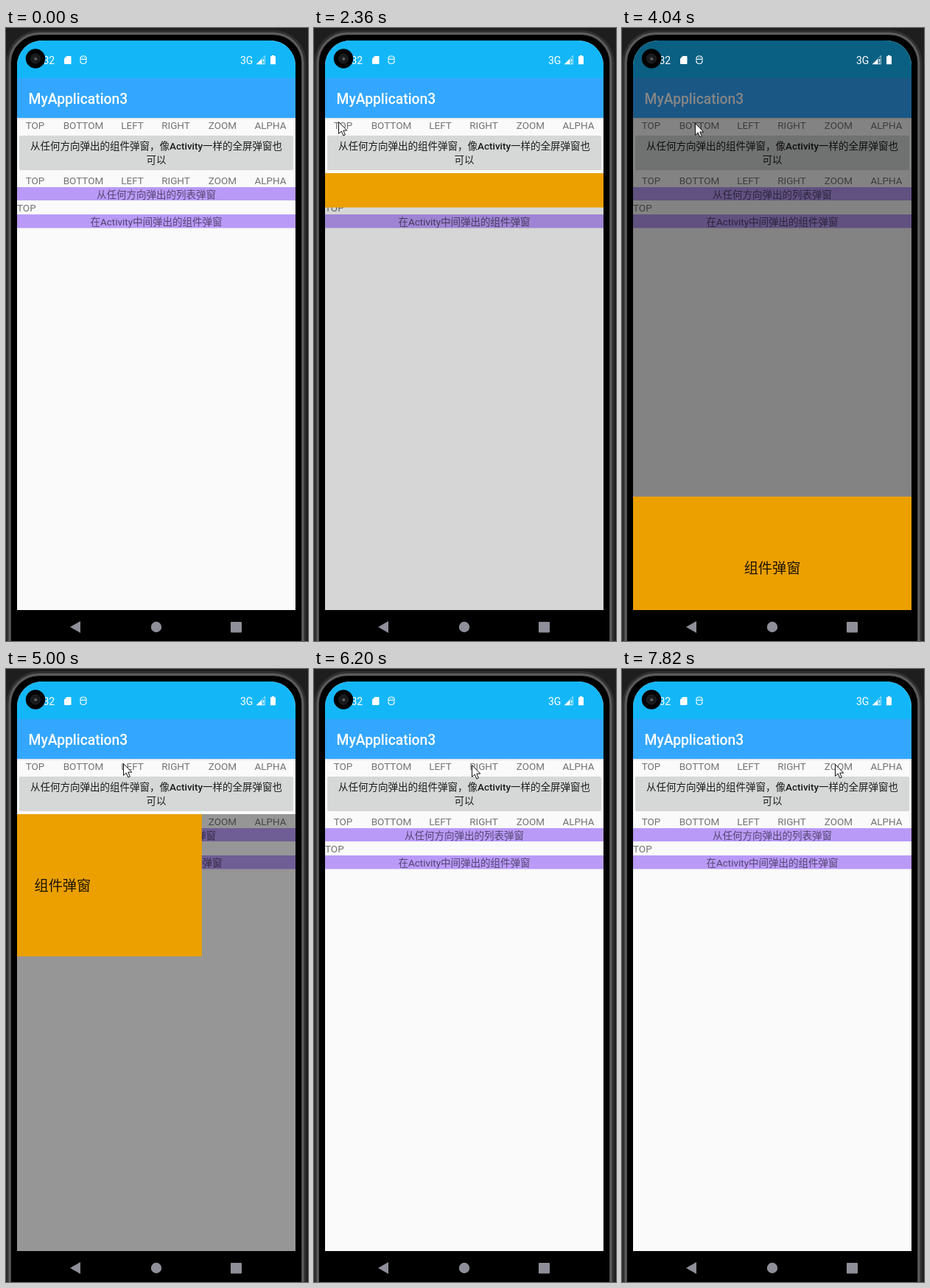
These frames come from a looping animation (410 px wide and 832 px high, 8000 ms). An HTML page:

```html
<!DOCTYPE html>
<html lang="zh-CN">
<head>
<meta charset="utf-8">
<title>MyApplication3</title>
<style>
@property --p { syntax: "<number>"; inherits: true; initial-value: 0; }
html, body { margin: 0; width: 100%; height: 100%; overflow: hidden; background: #000; }
svg { display: block; width: 100%; height: 100%; }
text { font: 13.5px Roboto, "Noto Sans CJK SC", "Noto Sans CJK", sans-serif; fill: #000; }
.soft { fill-opacity: .54; }
.strong { fill-opacity: .87; }
.mid text, text.mid { text-anchor: middle; }
.medium { font-weight: 500; }
.title { font-size: 19.3px; font-weight: 500; fill: #fff; }
.status text { font-size: 14px; fill: #fff; }
.sheet rect { fill: #eba000; }
.sheet text { font-size: 19.2px; }

/* --p is how far a popup is open: it drives both shade and slide */
.layer { --p: 0; animation: 8s cubic-bezier(.364, 0, .636, 1) infinite; }
.shade { opacity: calc(.6 * var(--p)); }
.top { animation-name: top; }
.bottom { animation-name: bottom; }
.left { animation-name: left; }
.right { animation-name: right; }
.top .sheet { transform: translateY(calc((var(--p) - 1) * 193px)); }
.bottom .sheet { transform: translateY(calc(593px - var(--p) * 193px)); }
.left .sheet { transform: translateX(calc((var(--p) - 1) * 378px)); }
.right .sheet { transform: translateX(calc((1 - var(--p)) * 378px)); }
@keyframes top {
  0%, 17.05% { --p: 0; } 20.8%, 27.83% { --p: 1; } 30.33%, 100% { --p: 0; }
}
@keyframes bottom {
  0%, 39.12% { --p: 0; } 42.87%, 49.77% { --p: 1; } 52.27%, 100% { --p: 0; }
}
@keyframes left {
  0%, 60.24% { --p: 0; } 63.99%, 70.87% { --p: 1; } 73.37%, 100% { --p: 0; }
}
@keyframes right {
  0%, 81.25% { --p: 0; } 85%, 91.75% { --p: 1; } 94.25%, 100% { --p: 0; }
}

.pointer { animation: move 8s ease-in-out infinite, appear 8s step-end infinite; }
.click { fill: #ff0; opacity: 0; animation: click 8s step-end infinite; }
@keyframes appear { 0% { opacity: 0; } 1.625%, 100% { opacity: 1; } }
@keyframes move {
  0%, 1.625% { transform: translate(370px, 764px); animation-timing-function: linear; }
  3.75% { transform: translate(325px, 560px); animation-timing-function: linear; }
  6.25% { transform: translate(200px, 185px); animation-timing-function: linear; }
  8% { transform: translate(122px, 62px); animation-timing-function: ease-out; }
  9% { transform: translate(95px, 42px); }
  11.125% { transform: translate(56px, 114px); animation-timing-function: ease-out; }
  13.75%, 18.625% { transform: translate(31px, 127px); }
  21.125%, 30% { transform: translate(33px, 127px); }
  34.5%, 51.25% { transform: translate(99px, 129px); }
  57.5%, 71.875% { transform: translate(159px, 128px); }
  77.25%, 92.5% { transform: translate(214px, 130px); }
  97.625%, 100% { transform: translate(289px, 129px); }
}
@keyframes click {
  0%, 17.5%, 28.375%, 39.75%, 50.25%, 60%, 71.375%, 81.625%, 92.25%, 100% { opacity: 0; }
  16.125%, 27%, 37.875%, 48.875%, 58.375%, 70%, 80%, 90.875% { opacity: .47; }
}
</style>
</head>
<body>
<svg viewBox="0 0 410 832">
  <defs>
    <clipPath id="screen"><path d="M15 790V51A34 34 0 0 1 49 17H359A34 34 0 0 1 393 51V790Z"/></clipPath>
    <clipPath id="body"><path d="M15 197H393V790H15Z"/></clipPath>
    <linearGradient id="shadow" x2="0" y2="1">
      <stop stop-opacity=".1"/><stop offset="1" stop-opacity="0"/>
    </linearGradient>
    <g id="labels" class="mid">
      <text class="soft" x="39.5">TOP</text>
      <text class="soft" x="105">BOTTOM</text>
      <text class="soft" x="171.5">LEFT</text>
      <text class="soft" x="230.5">RIGHT</text>
      <text class="soft" x="294">ZOOM</text>
      <text class="soft" x="359">ALPHA</text>
    </g>
    <rect id="shade" x="15" y="17" width="378" height="773"/>
    <g id="sheet" class="sheet">
      <rect x="15" y="197" width="378" height="193"/>
      <text class="mid strong" x="204" y="301">组件弹窗</text>
    </g>
  </defs>

  <!-- phone case -->
  <rect width="410" height="832" fill="#1e1e1e"/>
  <g fill="none">
    <rect x="4" y="6.5" width="400" height="900" rx="41" stroke="#303030" stroke-width="7"/>
    <rect x="5" y="7.5" width="398" height="900" rx="40" stroke="#5c5c5c" stroke-width="3"/>
  </g>
  <rect x="7" y="9.5" width="394" height="900" rx="38"/>

  <g clip-path="url(#screen)">
    <rect x="15" y="17" width="378" height="773" fill="#fafafa"/>
    <rect x="15" y="17" width="378" height="51" fill="#13b7f8"/>
    <rect x="15" y="68" width="378" height="54" fill="#33a7ff"/>
    <rect x="15" y="122" width="378" height="3" fill="url(#shadow)"/>
    <text class="title" x="30.5" y="102.5">MyApplication3</text>

    <use href="#labels" y="136.5"/>
    <rect x="18" y="146.5" width="372" height="46.5" rx="2" fill-opacity=".14"/>
    <rect x="18.5" y="146" width="371" height="46" rx="2" fill="#d6d7d7"/>
    <g class="mid">
      <text class="strong" x="204" y="164.5">从任何方向弹出的组件弹窗，像<tspan class="medium">Activity</tspan>一样的全屏弹窗也</text>
      <text class="strong" x="204" y="184">可以</text>
    </g>
    <use href="#labels" y="212"/>
    <path d="M15 216H393V234H15ZM15 253H393V271.5H15Z" fill="#b99af7"/>
    <text class="mid soft" x="204" y="230.5">从任何方向弹出的列表弹窗</text>
    <text class="soft" x="15" y="249">TOP</text>
    <text class="mid soft" x="204" y="268">在Activity中间弹出的组件弹窗</text>

    <g clip-path="url(#body)">
      <g class="layer top"><use href="#shade" class="shade"/><use href="#sheet" class="sheet"/></g>
      <g class="layer left"><use href="#shade" class="shade"/><use href="#sheet" class="sheet"/></g>
      <g class="layer right"><use href="#shade" class="shade"/><use href="#sheet" class="sheet"/></g>
    </g>
    <g class="layer bottom"><use href="#shade" class="shade"/><use href="#sheet" class="sheet"/></g>
  </g>

  <!-- status bar -->
  <g class="status" fill="#fff">
    <text x="50.5" y="48.5">32</text>
    <path d="M82.5 38H87.5Q88.5 38 88.5 39V48Q88.5 49 87.5 49H80Q79 49 79 48V41.5Z"/>
    <path d="M101 42.5V41Q101 38 105 38T109 41V42.5ZM101 43.5V45Q101 48.5 105 48.5T109 45V43.5" fill="none" stroke="#fff" stroke-width="1.2"/>
    <path d="M103 40.5H104.2M105.8 40.5H107" stroke="#fff"/>
    <text x="318" y="48.5">3G</text>
    <path d="M340 49L347.5 41.5V49Z"/>
    <path d="M347.5 41.5L351.5 37.5V49H340" fill="none" stroke="#fff" stroke-opacity=".6"/>
    <path d="M349.5 42V46M349.5 47V48.5" stroke="#fff" stroke-width="1.4"/>
    <path d="M361 37H364V38.2H366V49.2H359V38.2H361Z"/>
  </g>

  <!-- camera -->
  <circle cx="40" cy="41.5" r="13.2"/>
  <circle cx="40" cy="41.5" r="6.5" fill="#17191b" stroke="#222526"/>
  <circle cx="40" cy="41.5" r="2.6" fill="#34383a"/>
  <circle cx="40.5" cy="42" r="1.1" fill="#8a9092"/>

  <!-- navigation bar -->
  <g fill="#8f8f99">
    <path d="M87 813L101 805V821Z"/>
    <circle cx="204" cy="813" r="7.2"/>
    <rect x="305" y="806" width="15" height="14.5" rx="1"/>
  </g>

  <g class="pointer">
    <circle class="click" cy="1" r="15"/>
    <path d="M.5.5V16.5L4.2 13L6.8 19L9.3 18L6.8 12.1H11.8Z" fill="#fff" stroke="#111" stroke-width="1"/>
  </g>
</svg>
</body>
</html>
```
